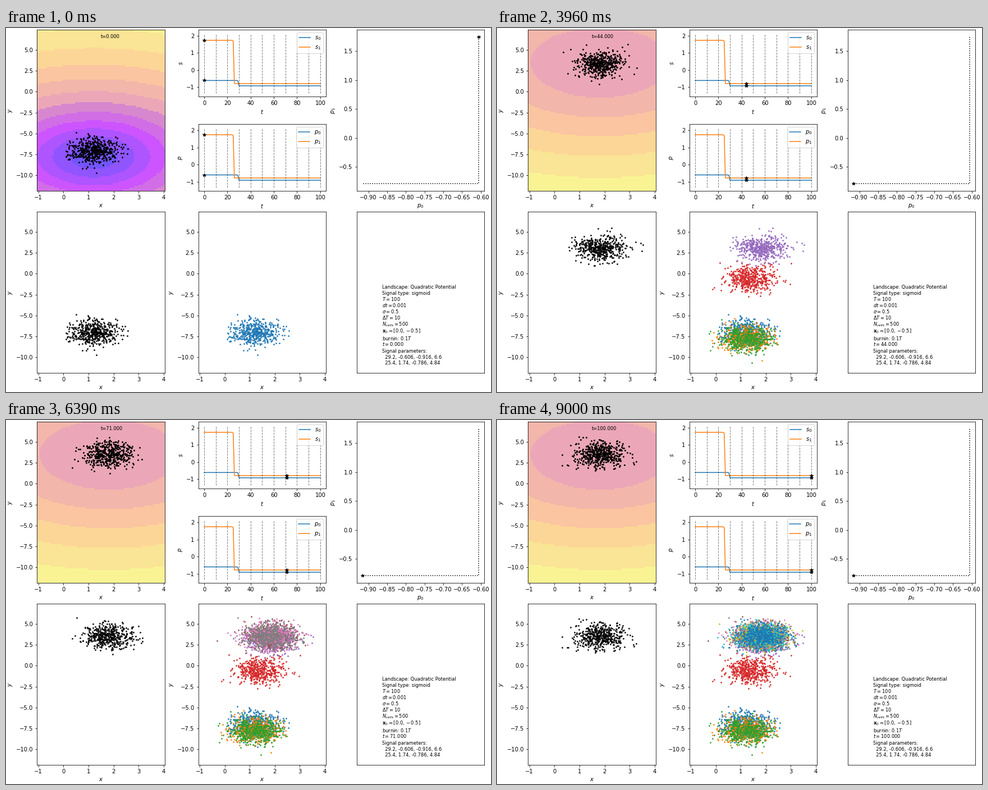
Recreate the animation shown at these times as a matplotlib script. Size 864 px wide and 648 px high, loop 9.09 s.

```python
import numpy as np
import matplotlib.pyplot as plt
from matplotlib.animation import FuncAnimation
from matplotlib.colors import LinearSegmentedColormap

W, H, DPI = 864, 648, 72
T, STEP, N_CELLS, SIGMA = 100, 10, 500, 0.5
STIFF = np.array([0.5, 0.222])          # curvature of the potential in x, y
XLIM, YLIM = (-1.05, 4.05), (-11.85, 7.40)

# critical time, start value, end value, rate
SIGNALS = [(29.2, -0.606, -0.916, 6.6), (25.4, 1.74, -0.786, 4.84)]

# even bands of log potential, from violet through pink to yellow
N_BANDS, BAND_START, BAND_STEP = 12, 0.21, 0.31
CMAP = LinearSegmentedColormap.from_list("bands", [
    (0, "#7255ff"), (3 / 11, "#cc55ff"), (5 / 11, "#d787ce"),
    (6 / 11, "#eba7b7"), (8 / 11, "#fac5a0"), (9 / 11, "#fcd697"),
    (1, "#f9f394")], N=N_BANDS)


def signal(t):
    """Both sigmoid signals at time t, on the last axis."""
    t = np.asarray(t, dtype=float)
    return np.stack([a + (b - a) / 2 * (1 + np.tanh(r * (t - tc)))
                     for tc, a, b, r in SIGNALS], axis=-1)


def simulate(dt=0.05):
    """Cell positions at t = 0..T, after a burn-in of 0.1 T."""
    rng = np.random.default_rng(7)
    decay = np.exp(-STIFF * dt)
    spread = SIGMA * np.sqrt((1 - decay ** 2) / (2 * STIFF))
    cells = np.tile([0.0, -0.5], (N_CELLS, 1))
    per_unit = round(1 / dt)
    out = []
    for k in range(-STEP * per_unit, T * per_unit + 1):
        if k >= 0 and k % per_unit == 0:
            out.append(cells.copy())
        centre = -signal(max(k, 0) * dt + dt / 2) / STIFF
        cells = (centre + (cells - centre) * decay
                 + spread * rng.standard_normal(cells.shape))
    return out


def landscape(p):
    """Band index of the potential at every grid point."""
    phi = (STIFF[0] / 2 * gx ** 2 + STIFF[1] / 2 * gy ** 2
           + p[0] * gx + p[1] * gy)
    level = np.log1p(np.maximum(phi - phi_low, 0))
    band = np.floor((level - BAND_START) / BAND_STEP) + 1
    return np.clip(band, 0, N_BANDS - 1)


def add_axes(left, top, height=286.4):
    return fig.add_axes([left / W, 1 - (top + height) / H,
                         227.5 / W, height / H])


def plane_axes(left, top):
    ax = add_axes(left, top)
    ax.set(xlim=XLIM, ylim=YLIM, xticks=range(-1, 5),
           yticks=np.arange(-10, 6, 2.5), xlabel="$x$", ylabel="$y$")
    return ax


def dots(ax, color, alpha=0.85):
    line, = ax.plot([], [], "o", color=color, ms=3, mew=0, alpha=alpha)
    return line


def star(ax):
    return ax.plot([], [], "k*", ms=6, zorder=5)[0]


def signal_axes(top, name):
    ax = add_axes(MID, top, 118.3)
    for i in range(2):
        ax.plot(times, values[:, i], label=f"${name}_{i}$")
    ax.vlines(times[::STEP], -1.35, 2.1, colors="k", linestyles="--",
              lw=1, alpha=0.5)
    ax.set(xlim=(-5, 105), ylim=(-1.53, 2.35), xticks=range(0, 101, 20),
           yticks=range(-1, 3), xlabel="$t$", ylabel=f"${name}$")
    ax.legend(loc="upper right")
    return star(ax)


def clock_row(t):
    return f"$t={t:.3f}$"


def info_rows():
    rows = ["Landscape: Quadratic Potential", "Signal type: sigmoid",
            f"$T={T}$", "$dt=0.001$", rf"$\sigma={SIGMA}$",
            rf"$\Delta T={STEP}$", f"$N_{{cells}}={N_CELLS}$",
            r"$\mathbf{x}_0=[0.0, -0.5]$", "burnin: $0.1T$",
            clock_row(0), "Signal parameters:"]
    return rows + ["  " + ", ".join(f"{v:g}" for v in s) for s in SIGNALS]


def write_info(ax):
    """Stack the rows upwards from the bottom; return the clock's text."""
    y, below, clock_text = 14.3, "", None
    for row in reversed(info_rows()):
        if below:
            y += 12.7 if "[" in row + below else 11   # brackets are taller
        text = ax.text(0.2, y / 286.4, row, transform=ax.transAxes,
                       fontsize="small")
        if row == clock_row(0):
            clock_text = text
        below = row
    return clock_text


times = np.arange(T + 1)
values = signal(times)
cells = simulate()
gx, gy = np.meshgrid(np.linspace(*XLIM, 100), np.linspace(*YLIM, 100))
phi_low = -np.sum(values[0] ** 2 / (2 * STIFF))

LEFT, MID, RIGHT = 55.5, 342.7, 624.5
UPPER, LOWER = 3.3, 327.4

plt.rcParams["font.family"] = "DejaVu Sans"
fig = plt.figure(figsize=(W / DPI, H / DPI), dpi=DPI, facecolor="white")

ax_land = plane_axes(LEFT, UPPER)
image = ax_land.imshow(landscape(values[0]), extent=XLIM + YLIM,
                       cmap=CMAP, vmin=0, vmax=N_BANDS - 1,
                       origin="lower", aspect="auto",
                       interpolation="nearest")
live = dots(ax_land, "k", 0.95)
clock = ax_land.text(0.5, 0.95, "", transform=ax_land.transAxes,
                     fontsize="small")

signal_stars = [signal_axes(UPPER, "s"), signal_axes(171.4, "p")]

ax_path = add_axes(RIGHT, UPPER)
ax_path.plot(values[:, 0], values[:, 1], "k:")
ax_path.set(xticks=np.arange(-0.9, -0.59, 0.05),
            yticks=np.arange(-0.5, 1.6, 0.5),
            xlim=(-0.9315, -0.5905), ylim=(-0.9123, 1.8663),
            xlabel="$p_0$", ylabel="$p_1$")
path_star = star(ax_path)

snapshot = dots(plane_axes(LEFT, LOWER), "k")
ax_all = plane_axes(MID, LOWER)
history = [dots(ax_all, f"C{i % 10}") for i in range(T // STEP + 1)]
for i, line in enumerate(history):
    line.set_data(*cells[i * STEP].T)

ax_info = add_axes(RIGHT, LOWER)
ax_info.set(xticks=[], yticks=[])
info_clock = write_info(ax_info)


def update(t):
    image.set_data(landscape(values[t]))
    live.set_data(*cells[t].T)
    clock.set_text(f"t={t:.3f}")
    info_clock.set_text(clock_row(t))
    for mark in signal_stars:
        mark.set_data([t, t], values[t])
    path_star.set_data(values[t, :1], values[t, 1:])
    last = t // STEP
    snapshot.set_data(*cells[last * STEP].T)
    for i, line in enumerate(history):
        line.set_visible(i <= last)
    return []


anim = FuncAnimation(fig, update, frames=T + 1, init_func=lambda: update(0),
                     interval=90, repeat=True, repeat_delay=0)
plt.show()
```
